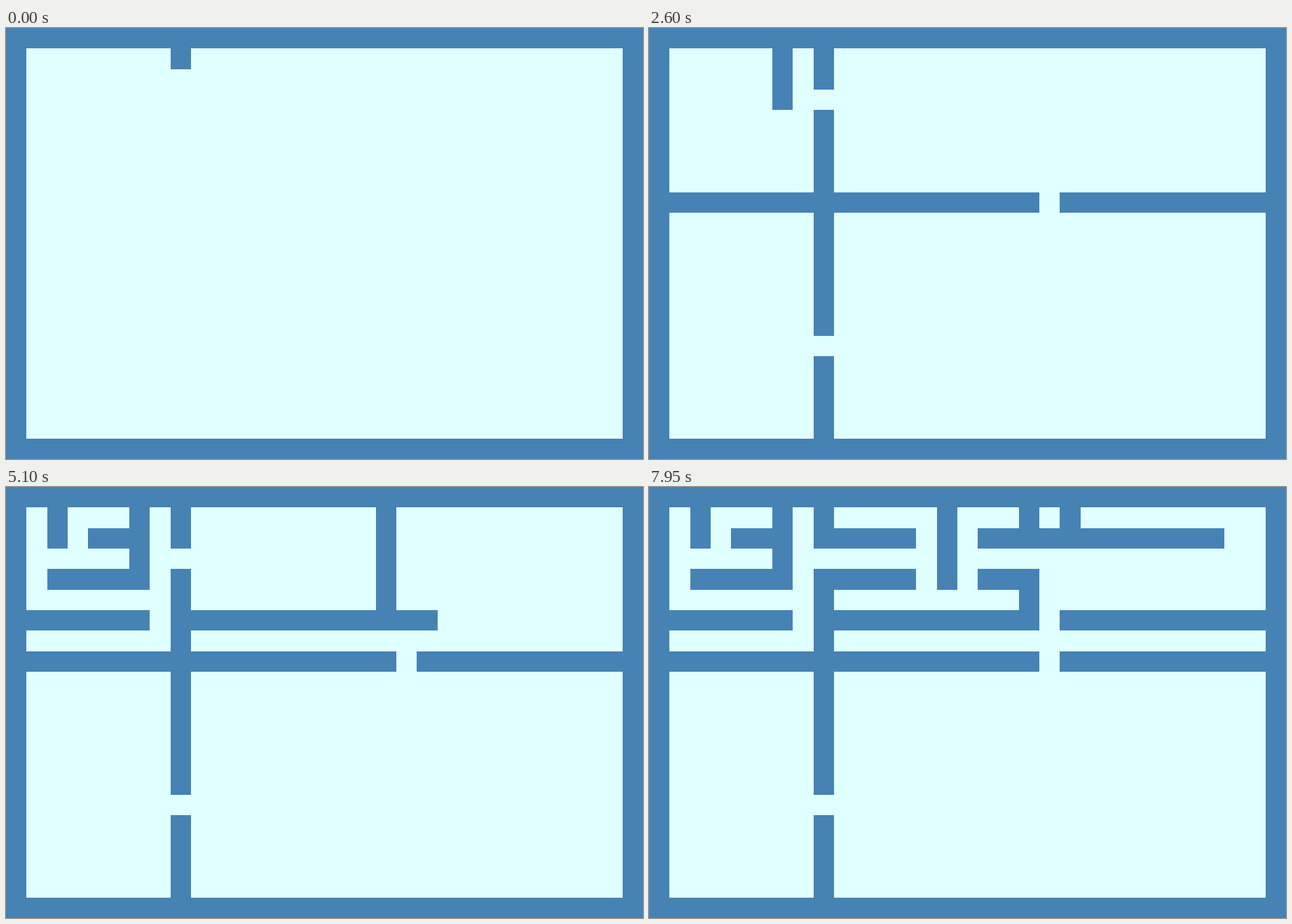
Animation, 909 px wide and 616 px high, one loop 8 s. Source, as an HTML page with a canvas:

```html
<!DOCTYPE html>
<html lang="en">
<head>
<meta charset="utf-8">
<title>Maze by recursive division</title>
<style>
  html, body { margin: 0; width: 100%; height: 100%; overflow: hidden; background: #4682b4; }
  canvas { display: block; }
</style>
</head>
<body>
<canvas id="maze" width="909" height="616"></canvas>
<script>
const WALL = '#4682b4', FLOOR = '#e0ffff';
const COLS = 31, ROWS = 21, STEP_MS = 50, LOOP_MS = 8000;
const canvas = document.getElementById('maze');
const ctx = canvas.getContext('2d');

// Each room is split by a cross of walls, then doors are opened in it.
const rooms = [
  { area: [1, 1, 29, 19], cross: [8, 8], doors: [[8, 3], [19, 8], [8, 15]] },
  { area: [1, 1, 7, 7], cross: [6, 6], doors: [[6, 5], [7, 6], [6, 7]] },
  { area: [1, 1, 5, 5], cross: [2, 4], doors: [[2, 3], [1, 4], [2, 5]] },
  { area: [3, 1, 5, 3], cross: [4, 2], doors: [[4, 1], [3, 2], [4, 3]] },
  { area: [9, 1, 29, 7], cross: [18, 6], doors: [[18, 3], [19, 6], [18, 7]] },
  { area: [9, 1, 17, 5], cross: [14, 2], doors: [[13, 2], [15, 2], [14, 5]] },
  { area: [9, 3, 13, 5], cross: [12, 4], doors: [[12, 3], [13, 4], [12, 5]] },
  { area: [15, 3, 17, 5], cross: [16, 4], doors: [[16, 3], [15, 4], [16, 5]] },
  { area: [19, 1, 29, 5], cross: [20, 2], doors: [] }
];

const steps = [];
for (const { area: [left, top, right, bottom], cross: [cx, cy], doors } of rooms) {
  for (let y = top; y <= bottom; y++)
    for (let x = left; x <= right; x++)
      if (x === cx || y === cy) steps.push([x, y, WALL]);
  for (const [x, y] of doors) steps.push([x, y, FLOOR]);
}

const edgeX = col => Math.round(col * canvas.width / COLS);
const edgeY = row => Math.round(row * canvas.height / ROWS);

function fillCells(x0, y0, x1, y1, color) {
  ctx.fillStyle = color;
  ctx.fillRect(edgeX(x0), edgeY(y0), edgeX(x1) - edgeX(x0), edgeY(y1) - edgeY(y0));
}

function draw(time) {
  const count = Math.floor(time % LOOP_MS / STEP_MS) + 1;
  fillCells(0, 0, COLS, ROWS, WALL);
  fillCells(1, 1, COLS - 1, ROWS - 1, FLOOR);
  for (const [x, y, color] of steps.slice(0, count)) fillCells(x, y, x + 1, y + 1, color);
}

const start = performance.now();
function tick() {
  draw(performance.now() - start);
  requestAnimationFrame(tick);
}
tick();
</script>
</body>
</html>
```
